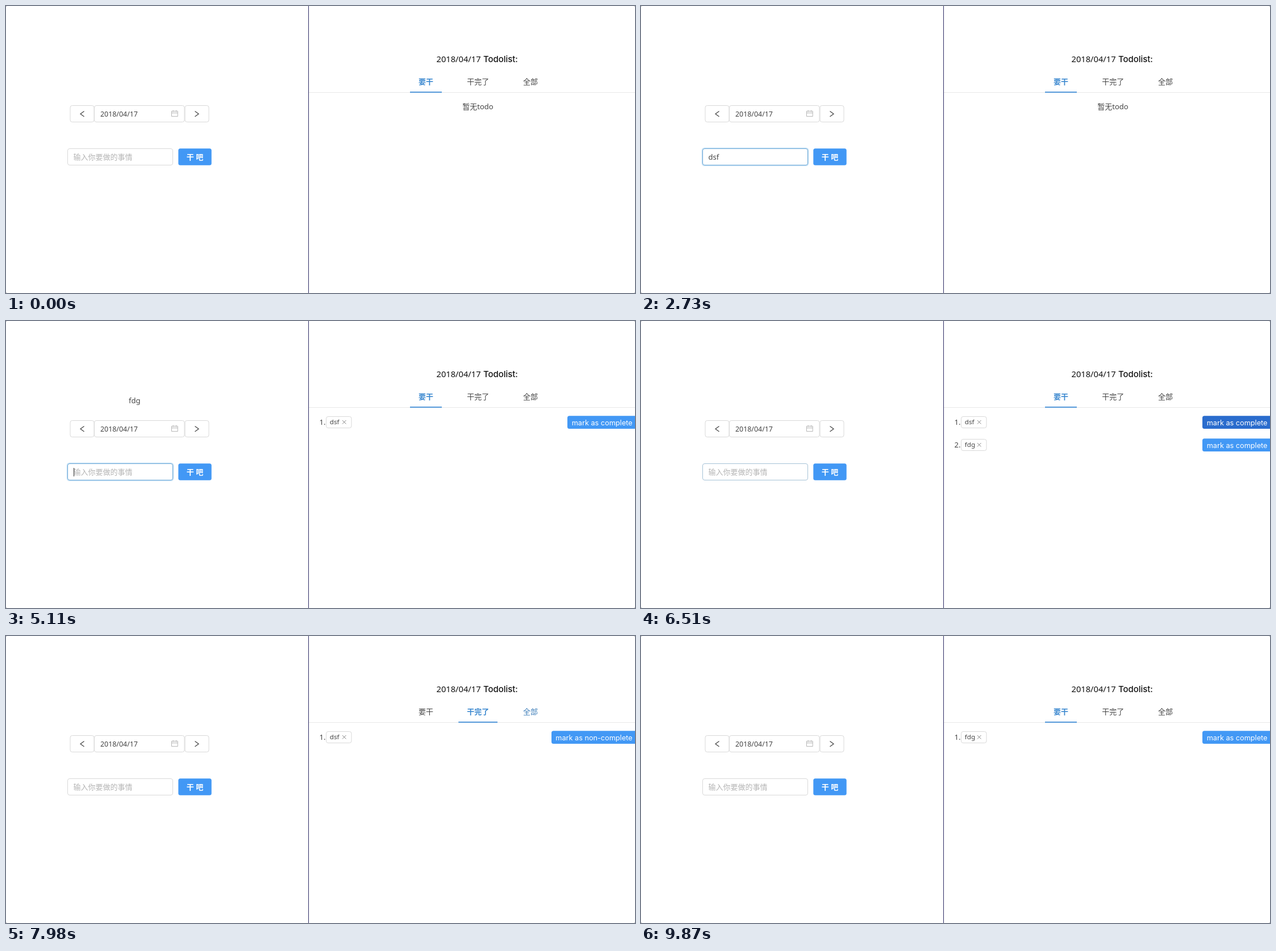
An HTML page for the animation above (9940 ms loop, 1107x506 px).

```html
<!DOCTYPE html>
<html lang="zh">
<head>
<meta charset="utf-8">
<title>Todolist</title>
<style>
html, body { margin: 0; width: 100%; height: 100%; overflow: hidden; background: #fff; }
svg { display: block; width: 1107px; height: 506px; }
text { font: 13px "Noto Sans", "Noto Sans CJK SC", "Noto Sans CJK", sans-serif; fill: #444; white-space: pre; }
.box { fill: #fff; stroke: #d9d9d9; }
.icon { fill: none; stroke: #444; stroke-width: 1.2; }
.date { font-size: 12.4px; }
.title { font-size: 14.7px; font-weight: 500; fill: #111; }
.name { font: 500 14.9px Inter, "Liberation Sans", sans-serif; fill: #111; }
.hint { fill: #b4b4b4; }
.white { fill: #fff; }
.bold { font-weight: 700; }
.mid { text-anchor: middle; }
.end { text-anchor: end; font-family: Inter, "Liberation Sans", sans-serif; fill: #fff; }
.big { font-size: 12.7px; }
.small { font-size: 11.1px; }
.tag { font-size: 11.6px; }
</style>
</head>
<body>
<svg viewBox="0 0 1107 506">
  <defs><clipPath id="right"><rect x="533" y="153" width="574" height="353"/></clipPath></defs>
  <rect width="1107" height="506" fill="#999"/>
  <rect width="1107" height="506" rx="2" fill="#fff"/>
  <path d="M532.5 0V506" stroke="#2f2c66"/>
  <path d="M533 152.5H1107" stroke="#e8e8e8"/>
  <text class="title" x="757.5" y="98.5">2018/04/17</text>
  <text class="name" x="840" y="98.5">Todolist:</text>

  <rect class="box" x="113" y="175.5" width="42" height="29" rx="3.5"/>
  <rect class="box" x="155.5" y="175.5" width="158.5" height="29" rx="3.5"/>
  <rect class="box" x="315" y="175.5" width="42" height="29" rx="3.5"/>
  <path class="icon" d="M137.5 185.5L131 190.2L137.5 195M332.5 185.5L339 190.2L332.5 195"/>
  <text class="date" x="166" y="195">2018/04/17</text>
  <path d="M291.5 185.5H302.2V194.7H291.5ZM291.5 188.5H302.2M294.2 183.7V186.5M299.5 183.7V186.5" fill="none" stroke="#b5b5b5"/>

  <rect id="glow" x="107.5" y="250.5" width="187" height="31" rx="4.5" fill="none" stroke="#cfe6f8" stroke-width="2"/>
  <rect id="field" class="box" x="108.5" y="251.5" width="185" height="29" rx="3.5"/>
  <text id="value" x="118.5" y="271"></text>
  <path id="caret" d="M0 259V274" stroke="#333"/>
  <rect x="303.3" y="251.3" width="58.4" height="29.4" rx="3.5" fill="#4298f5"/>
  <text class="white bold mid" x="332.5" y="271.3">干 吧</text>

  <g id="tabs"></g>
  <rect id="ink" y="151" height="1.7" fill="#3a8ad6"/>
  <g clip-path="url(#right)"><g id="panes"></g></g>
  <text id="flyer" class="mid"></text>
</svg>
<script>
const LOOP = 9940, PANE = 596, FLIGHT = 1025;
const FOCUS = 1400, BLUR = 6350, PRESS = 6380, DONE = 6700;
const BLUE = [66, 152, 245], DARK = [42, 108, 205], PALE = [92, 172, 250];

const TASKS = [
  { name: 'dsf', keys: [2030, 2100, 2200], sent: 2788, row: 0 },
  { name: 'fdg', keys: [4130, 4200, 4270], sent: 4888, row: 1 }
];
for (const task of TASKS) task.added = task.sent + FLIGHT;

const TABS = [
  { label: '要干', x: 711, w: 56, hover: [9020, 9400] },
  { label: '干完了', x: 796.3, w: 68.7, hover: [7380, 7860] },
  { label: '全部', x: 895, w: 56, hover: [7880, 8900] }
];
const CLICKS = [
  { at: 7480, from: 0, to: 1 },
  { at: 8350, from: 1, to: 2 },
  { at: 9230, from: 2, to: 0 }
];

const $ = id => document.getElementById(id);
const clamp = v => Math.max(0, Math.min(1, v));
const span = (t, from, length) => clamp((t - from) / length);
const mix = (a, b, p) => a + (b - a) * p;
const rgb = (a, b, p) => `rgb(${a.map((v, i) => Math.round(mix(v, b[i], p)))})`;
const ease = p => p < 0.5 ? 4 * p ** 3 : 1 - (2 - 2 * p) ** 3 / 2;
const label = (x, y, cls, str, extra = '') => `<text x="${x}" y="${y}" class="${cls}" ${extra}>${str}</text>`;
const pill = (x, y, h, fill) => `<rect x="${x}" y="${y}" width="${1120 - x}" height="${h}" rx="3.5" fill="${fill}"/>`;

function drawInput(t) {
  const focus = span(t, FOCUS, 280) * (1 - span(t, BLUR, 280));
  const typing = TASKS.find(k => t >= k.keys[0] && t < k.sent);
  const text = typing ? typing.name.slice(0, typing.keys.filter(k => t >= k).length) : '';
  const value = $('value');
  value.textContent = text || '输入你要做的事情';
  value.setAttribute('class', text ? '' : 'hint');
  $('field').style.stroke = rgb([217, 217, 217], [98, 163, 212], focus);
  $('glow').style.opacity = t < BLUR ? focus : clamp(focus * 2 - 1);

  const events = [1450, ...TASKS.flatMap(k => [...k.keys, k.sent])];
  const last = Math.max(...events.filter(e => e <= t));
  const lit = t >= events[0] && t < BLUR && (t - last) % 1000 < 500;
  const x = 119.5 + (text ? value.getComputedTextLength() : 0);
  $('caret').style.display = lit ? '' : 'none';
  $('caret').setAttribute('transform', `translate(${x} 0)`);
}

function drawFlyer(t) {
  const task = TASKS.find(k => t >= k.sent && t < k.added);
  const flyer = $('flyer');
  flyer.textContent = task ? task.name : '';
  if (!task) return;
  const p = span(t, task.sent, FLIGHT);
  flyer.setAttribute('x', mix(128.5, 578, p));
  flyer.setAttribute('y', mix(271, 183 + 40 * task.row, p) - 680 * p * (1 - p));
}

function currentTab(t) {
  const click = CLICKS.filter(c => t >= c.at).pop() || { at: -1000, from: 0, to: 0 };
  return { ...click, slide: ease(span(t, click.at, 300)), fade: span(t, click.at, 450) };
}

function drawTabs(t, tab) {
  $('tabs').innerHTML = TABS.map((item, i) => {
    const [enter, leave] = item.hover;
    let p = span(t, enter, 120) * (1 - span(t, leave, 150));
    if (i === tab.to) p = Math.max(p, span(t, tab.at, 200));
    return label(item.x + item.w / 2, 137.5, i === tab.to ? 'mid bold' : 'mid', item.label,
      `style="fill:${rgb([68, 68, 68], [62, 138, 208], p)}"`);
  }).join('');
  const a = TABS[tab.from], b = TABS[tab.to];
  $('ink').setAttribute('x', mix(a.x, b.x, tab.slide));
  $('ink').setAttribute('width', mix(a.w, b.w, tab.slide));
}

function action(t, pane, task, y) {
  if (pane === 2) {
    return task.row === 0
      ? pill(1045.5, y - 10.5, 20.5, '#98dd76') + label(1102.5, y + 3.5, 'end small', 'complete')
      : pill(1021, y - 10.5, 20.5, '#db4d23') + label(1102.5, y + 3.5, 'end small', 'non-complete');
  }
  if (pane === 1) {
    return pill(960, y - 10.7, 22.7, `rgb(${BLUE})`) + label(1102.5, y + 6, 'end big', 'mark as non-complete');
  }
  const fill = task.row === 0
    ? rgb(BLUE, DARK, span(t, PRESS, 120))
    : rgb(BLUE, PALE, span(t, DONE, 100) * (1 - span(t, 6950, 200)));
  return pill(988, y - 10.7, 22.7, fill) + label(1102.5, y + 6, 'end big', 'mark as complete');
}

function drawPane(t, pane) {
  const items = TASKS.filter(k => t >= k.added).filter(k => {
    const done = k.row === 0 && t >= DONE;
    return pane === 2 || done === (pane === 1);
  });
  if (!items.length) return label(830.5, 182, 'mid', '暂无todo');
  return items.map((task, i) => {
    const y = 178 + 40 * i;
    return `<g opacity="${span(t, task.added - 30, 150)}">` +
      label(551.5, y + 4.5, '', `${i + 1}.`) +
      `<rect class="box" x="563.5" y="${y - 9.5}" width="44.5" height="20" rx="3.5"/>` +
      label(569.8, y + 4.3, 'tag', task.name) +
      `<path d="M592 ${y - 3}l6.5 6.5m0 -6.5l-6.5 6.5" stroke="#858585" fill="none"/>` +
      action(t, pane, task, y) + '</g>';
  }).join('');
}

function drawPanes(t, tab) {
  const pos = mix(tab.from, tab.to, tab.slide);
  $('panes').innerHTML = TABS.map((_, i) => {
    const shown = i === tab.to ? tab.fade : i === tab.from ? 1 - tab.fade : 0;
    return shown
      ? `<g transform="translate(${(i - pos) * PANE} 0)" opacity="${shown}">${drawPane(t, i)}</g>` : '';
  }).join('');
}

function render(now) {
  const t = now % LOOP, tab = currentTab(t);
  drawInput(t);
  drawFlyer(t);
  drawTabs(t, tab);
  drawPanes(t, tab);
}

const start = performance.now();
(function tick() {
  render(performance.now() - start);
  requestAnimationFrame(tick);
})();
</script>
</body>
</html>
```
